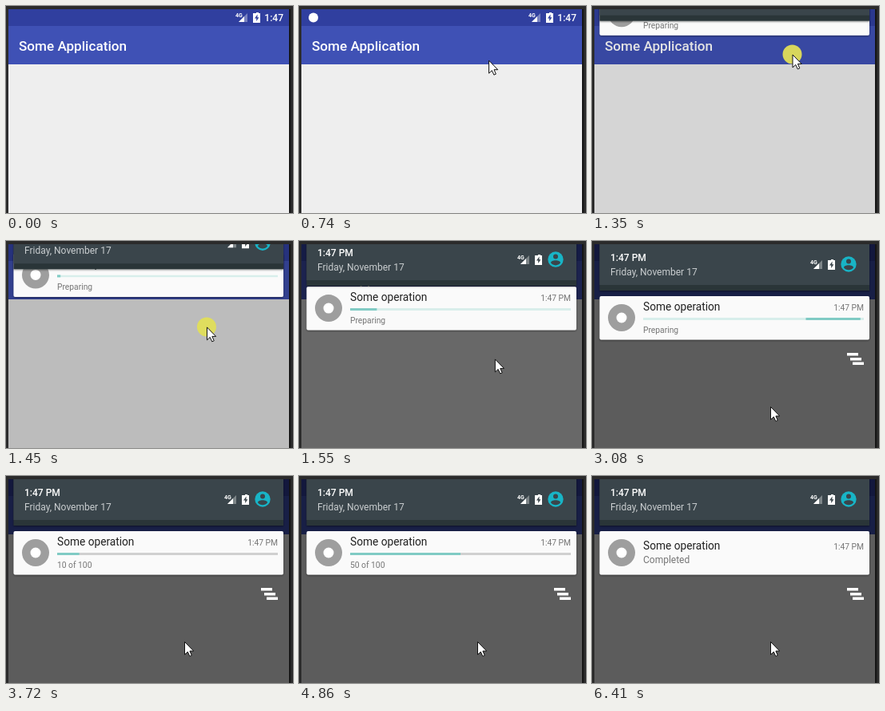
These frames come from a looping animation (359 by 259 pixels, 7.66 s). An HTML page:

```html
<!DOCTYPE html>
<html lang="en">
<head>
<meta charset="utf-8">
<title>Progress notification</title>
<style>
  html, body { margin: 0; width: 100%; height: 100%; overflow: hidden; background: #2b2b2b; }
  svg { display: block; }
  text { font-family: Roboto, "Noto Sans", sans-serif; white-space: pre; }
  .medium { font-weight: 500; }
  .end { text-anchor: end; }
</style>
</head>
<body>
<svg width="359" height="259" viewBox="0 0 359 259">
  <defs>
    <clipPath id="screen"><rect x="3" y="4" width="351" height="255"/></clipPath>
    <filter id="shadow" x="-5%" y="-20%" width="110%" height="150%">
      <feDropShadow dx="0" dy="1" stdDeviation="1" flood-opacity=".45"/>
    </filter>
    <g id="signals" fill="#fff">
      <text x="0" y="6" font-size="7" font-weight="700" textLength="">4G</text>
      <path d="M15 1V12H4Z" opacity=".35"/>
      <path d="M11 5V12H4Z"/>
      <path d="M24 1h2v-1h3v1h2v12h-9v-12z"/>
    </g>
    <path id="bolt" d="M27.6 2.5L24 7.5h2.2v3.5L29.4 6.2h-2z"/>
  </defs>

  <rect x="354" width="2" y="4" height="255" fill="#151515"/>

  <g clip-path="url(#screen)">
    <rect x="3" y="73" width="351" height="186" fill="#eee"/>
    <rect x="3" y="4" width="351" height="21" fill="#303f9f"/>
    <rect x="3" y="25" width="351" height="48" fill="#3f51b5"/>
    <circle id="statusDot" cx="18" cy="14.5" r="6" fill="#fff"/>
    <use href="#signals" x="287" y="8"/>
    <use href="#bolt" x="287" y="8" fill="#303f9f"/>
    <text class="medium end" x="347" y="19" font-size="12" fill="#fff">1:47</text>
    <text class="medium" x="16" y="56" font-size="17.14" fill="#fff">Some Application</text>

    <rect id="scrim" x="3" y="4" width="351" height="255"/>

    <g id="panel">
      <g id="card">
        <rect x="9.5" y="69" width="337.5" height="54.5" rx="2" fill="#fafafa" filter="url(#shadow)"/>
        <circle cx="37" cy="96" r="17" fill="#9e9e9e"/>
        <circle cx="37" cy="96" r="6.5" fill="#fff"/>
        <g id="heading">
          <text x="64" y="87" font-size="13.71" fill="#212121">Some operation</text>
          <text class="end" x="340" y="87" font-size="10.29" fill="#757575">1:47 PM</text>
        </g>
        <svg id="bar" x="64" y="96" width="276" height="3">
          <rect id="track" width="276" height="3"/>
          <g id="waves" fill="#80cbc4">
            <g><rect x="-138" width="276" height="3"/></g>
            <g><rect x="-138" width="276" height="3"/></g>
          </g>
          <rect id="fill" height="3" fill="#80cbc4"/>
        </svg>
        <text id="label" x="64" fill="#757575"></text>
        <path id="clear" fill="#fff" d="M319 140h14v3.5h-14zM323 146h14v3.5h-14zM326 151.500h14v3.500h-14z"/>
      </g>
      <g id="header">
        <rect x="9.5" y="-20" width="337.5" height="82" fill="#2b3439" filter="url(#shadow)"/>
        <rect x="9.5" y="-20" width="337.5" height="75" fill="#3a454b"/>
        <text class="medium" x="23" y="25" font-size="12" fill="#fff">1:47 PM</text>
        <text x="23" y="43" font-size="12" fill="#c9cdcf">Friday, November 17</text>
        <use href="#signals" x="273" y="23"/>
        <use href="#bolt" x="273" y="23" fill="#3a454b"/>
        <circle cx="321" cy="29" r="9.7" fill="#18b4c6"/>
        <circle cx="321" cy="25.500" r="3" fill="#3a454b"/>
        <path d="M315 33.200c0-4 12-4 12 0a7.300 7.300 0 0 1-12 0z" fill="#3a454b"/>
      </g>
    </g>
  </g>

  <g id="cursor">
    <circle id="press" r="12" fill="#e0de58" opacity=".95"/>
    <path d="M.5.5V16.500L4.300 13L6.800 18.500L9.300 17.400L6.900 12H11.700Z" fill="#fff" stroke="#111" stroke-linejoin="round"/>
  </g>
</svg>

<script>
const LOOP = 7660, BAR = 276;
const OPEN = 1250, RELEASE = 1500, WAVE_START = 1405, WAVE_TIME = 1965;
const DONE = 6410;
// Times at which 10, 20 ... 100 percent is reached
const TICKS = [3720, 3990, 4270, 4580, 4860, 5190, 5470, 5770, 6080, 6360];

// [time, x, y, ease out on the way here]
const CURSOR = [
  [410, 232, 229], [740, 237, 68], [1100, 250, 13, true], [OPEN, 250, 13],
  [1450, 251, 107], [1550, 245, 147], [1820, 223, 207, true]
];
// [time, card offset, scrim opacity, ease]
const PANEL = [[OPEN, -120, 0], [1450, -54, .21], [1550, -12, .56], [1820, 0, .61, true]];

const $ = id => document.getElementById(id);
const clamp = v => Math.min(1, Math.max(0, v));
const show = (id, on) => { $(id).style.display = on ? '' : 'none'; };
const move = (id, x, y) => $(id).setAttribute('transform', `translate(${x} ${y})`);

function at(keys, t) {
  let i = keys.findIndex(k => k[0] > t);
  if (i < 0) return keys[keys.length - 1].slice(1, 3);
  if (i === 0) return keys[0].slice(1, 3);
  const a = keys[i - 1], b = keys[i];
  let p = (t - a[0]) / (b[0] - a[0]);
  if (b[3]) p = 1 - (1 - p) ** 2;
  return [1, 2].map(n => a[n] + (b[n] - a[n]) * p);
}

// Material indeterminate bar: rows of [offset, value, easing]
function wave(el, rows, css) {
  const frames = rows.map(([offset, v, curve]) => ({
    offset, transform: css(v), easing: curve ? `cubic-bezier(${curve})` : 'linear'
  }));
  const a = el.animate(frames, { duration: WAVE_TIME, iterations: Infinity });
  a.pause();
  return a;
}
const slide = start => v => `translateX(${(start + v) / 100 * BAR}px)`;
const scale = v => `scaleX(${v})`;
const [first, second] = $('waves').children;
const waves = [
  wave(first, [
    [0, 0], [.2, 0, '.5,0,.7017,.4958'],
    [.5915, 83.671, '.3024,.3814,.55,.9564'], [1, 200.611]
  ], slide(-95.167)),
  wave(first.firstElementChild, [
    [0, .08], [.3665, .08, '.3347,.1248,.7858,1'],
    [.6915, .6615, '.06,.11,.6,1'], [1, .08]
  ], scale),
  wave(second, [
    [0, 0, '.15,0,.5151,.4097'], [.25, 37.652, '.3103,.2841,.8,.7337'],
    [.4835, 84.386, '.4,.627,.6,.902'], [1, 160.278]
  ], slide(-4.889)),
  wave(second.firstElementChild, [
    [0, .08, '.205,.0571,.5766,.454'], [.1915, .4571, '.1523,.1964,.6484,1.0043'],
    [.4415, .728, '.2578,-.0032,.2118,1.3818'], [1, .08]
  ], scale)
];

function draw(t) {
  const done = t >= DONE;
  const percent = 10 * TICKS.filter(k => k <= t).length;

  show('cursor', t >= 410);
  move('cursor', ...at(CURSOR, t));
  show('press', t >= OPEN && t < RELEASE);
  $('statusDot').setAttribute('r', 6 * clamp((t - 400) / 150));

  const [drop, dim] = at(PANEL, t);
  $('scrim').setAttribute('opacity', dim);
  show('panel', t >= OPEN);
  move('card', 0, drop);
  move('header', 0, drop / 2);
  $('clear').setAttribute('opacity', clamp((t - 1650) / 250));

  show('bar', !done);
  show('waves', !percent);
  $('track').setAttribute('fill', percent ? '#d0d0d0' : '#d8eeeb');
  $('fill').setAttribute('width', BAR * percent / 100);
  for (const a of waves) a.currentTime = Math.max(0, t - WAVE_START);

  move('heading', 0, done ? 5 : 0);
  $('label').textContent = done ? 'Completed' : percent ? `${percent} of 100` : 'Preparing';
  $('label').setAttribute('y', done ? 109 : 115);
  $('label').setAttribute('font-size', done ? 12 : 10.29);
}

const begin = performance.now();
function tick() {
  draw((performance.now() - begin) % LOOP);
  requestAnimationFrame(tick);
}
draw(0);
requestAnimationFrame(tick);
</script>
</body>
</html>
```
